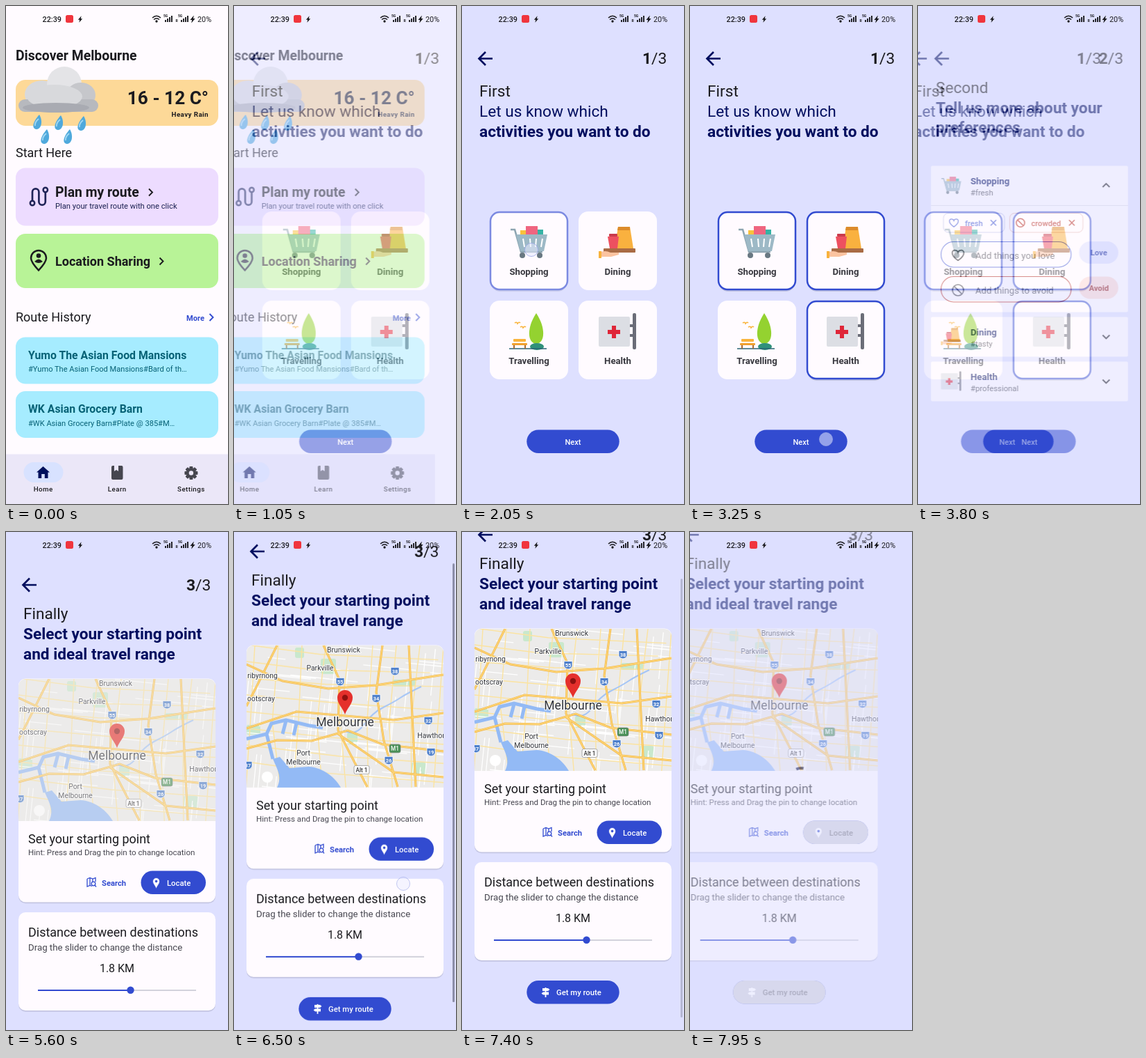
These frames come from a looping animation (320 by 715 pixels, 8000 ms). An HTML page:

```html
<!DOCTYPE html>
<html lang="en">
<head>
<meta charset="utf-8">
<title>Route planner</title>
<style>
  html, body { margin: 0; width: 100%; height: 100%; overflow: hidden; background: #dee0ff; }
  svg { display: block; width: 320px; height: 715px; font-family: Roboto, "Noto Sans", sans-serif; }
  text { white-space: pre; }
</style>
</head>
<body>
<svg id="stage" viewBox="0 0 320 715"></svg>
<script>
const LOOP = 8000;
const INK = '#1b1b1f', GREY = '#46464f', NAVY = '#000d5e', BLUE = '#324bd0', RED = '#b3261e';
const PAPER = '#fffbff', LAVENDER = '#dee0ff', TEAL = '#076276';
const SLIDE = 'cubic-bezier(.3,0,.3,1)', SLIDE_MS = 300, SLIDE_PX = 32;

// Markup helpers
const text = (x, y, str, size, fill = INK, weight = 400, more = '') =>
  `<text x="${x}" y="${y}" font-size="${size}" fill="${fill}" font-weight="${weight}" ${more}>${str}</text>`;
const mid = (x, y, str, size, fill, weight, more = '') =>
  text(x, y, str, size, fill, weight, `text-anchor="middle" ${more}`);
const rect = (x, y, w, h, r, fill, more = '') =>
  `<rect x="${x}" y="${y}" width="${w}" height="${h}" rx="${r}" fill="${fill}" ${more}/>`;
const dot = (x, y, r, fill, more = '') => `<circle cx="${x}" cy="${y}" r="${r}" fill="${fill}" ${more}/>`;
const oval = (x, y, rx, ry, fill) => `<ellipse cx="${x}" cy="${y}" rx="${rx}" ry="${ry}" fill="${fill}"/>`;
const shape = (d, fill, more = '') => `<path d="${d}" fill="${fill}" ${more}/>`;
const line = (d, stroke, width = 2, more = '') =>
  `<path d="${d}" fill="none" stroke="${stroke}" stroke-width="${width}" ${more}/>`;
const group = (x, y, body, scale = 1) => `<g transform="translate(${x} ${y}) scale(${scale})">${body}</g>`;
const raised = (x, y, w, h, r) => rect(x, y + 1.8, w, h, r, '#c3c5e2') + rect(x, y, w, h, r, PAPER);
const page = (id, fill, body) => `<g id="${id}">${rect(-40, 0, 400, 715, 0, fill)}${body}</g>`;
const chevron = (x, y, color) => line(`M${x - 2.5} ${y - 5}l5 5-5 5`, color, 1.9);
const cross = (x, y, color) => line(`M${x - 4} ${y - 4}l8 8m0-8l-8 8`, color, 1.6);
const ban = (x, y, r, color) =>
  dot(x, y, r, 'none', `stroke="${color}" stroke-width="1.6"`) + line(`M${x - r * .7} ${y - r * .7}l${r * 1.4} ${r * 1.4}`, color, 1.6);
const heart = (x, y, s, color) =>
  group(x, y, line('M0 7C-12-1-8-8-4-7Q-1-7 0-4Q1-7 4-7C8-8 12-1 0 7Z', color, 1.6), s);
const pin = (x, y, s, fill, hole) =>
  group(x, y, shape('M0 24C-3 15-11 9-11 0A11 11 0 0 1 11 0C11 9 3 15 0 24Z', fill) + dot(0, 0, 4.2, hole), s);

// Illustrations, each centred on the origin
const art = {
  Shopping:
    rect(-12, -17, 10, 8, 0, '#f9c23c') + rect(-4, -23, 17, 13, 0, '#ef6580') + rect(13, -18, 8, 8, 0, '#35b3a5') +
    line('M-26-18H-20L-11 14H20', '#8da5b1', 2.6) + shape('M-18-11H27L22 13H-12Z', '#9db9c6') +
    line('M-8-5l2 12M2-5l1 12M11-5l-1 12M20-5l-2 12', '#fff', 2) + dot(-9, 19, 4, '#687882') + dot(16, 19, 4, '#687882'),
  Dining:
    shape('M1-22H18L23 9H-4Z', '#f9b13f') + shape('M1-22H18V-17H0Z', '#dc8b2b') +
    shape('M-14-8H2L0 9H-11Z', '#ed5060') + rect(-12, -12, 12, 4, 1, '#c93b4c') +
    rect(-20, 9, 46, 6, 1, '#a96b45') + shape('M-26 15Q-18 11-10 15H2V18L-9 21H-26Z', '#fbc3a0') + rect(-27, 13, 4, 10, 0, '#f8b23c'),
  Travelling:
    rect(10, 2, 2, 22, 0, '#8b5a34') + shape('M11-26C25-5 24 17 11 18C-2 17-3-5 11-26Z', '#94d230') +
    oval(12, 22, 10, 5, '#30917a') + line('M-28 25H26', '#2a6474', 1.6) +
    rect(-22, 11, 18, 4, 1, '#f9b43d') + rect(-24, 17, 22, 3, 1, '#f0a02e') + line('M-21 20v5M-5 20v5', '#a66a35', 2) +
    line('M-20-12q3-2 4 1q2-3 4-1M-12-6q3-2 4 1q2-3 4-1', '#f9b43d', 1.6),
  Health:
    rect(22, -26, 5, 52, 2, '#6b6d78') + rect(16, -10, 8, 4, 0, '#6b6d78') + rect(16, 4, 8, 4, 0, '#6b6d78') +
    rect(-27, -21, 45, 43, 2, '#dcdee4') + shape('M-8-10h6v6h6v6h-6v6h-6v-6h-6v-6h6Z', '#df2638', 'transform="translate(0 2)"'),
};

const statusBar = () => {
  const bars = x => [3, 5, 7, 9].map((h, i) => rect(x + i * 3, 23 - h, 1.9, h, 0, INK)).join('');
  const bolt = (x, s) => group(x, 19, shape('M2-6L-4 1H-1L-2 6L4-1H1Z', INK), s);
  return text(52.5, 23, '22:39', 10.8, INK, 500) + rect(86, 13, 11, 11, 2.5, '#f0353d') + bolt(107, .8) +
    line('M211 17Q217 11.5 223 17M213 19.5Q217 16 221 19.5', INK, 1.6) + dot(217, 22, 1.7, INK) +
    text(227, 16, '5G', 5, INK, 700) + bars(229) + text(248, 16, '5G', 5, INK, 700) + text(244.5, 23, 'R', 5, INK, 700) + bars(252) +
    bolt(269, .9) + text(276, 23, '20%', 10.8);
};

const home = () => {
  const drop = (x, y) => group(x, y, shape('M3-11C8-3 7 9-1 10C-9 9-6-1 3-11Z', '#4fa9dc') + line('M2-5Q-4 0-3 5', '#9fd6f2', 2));
  const cloud = oval(52, 127, 25, 20, '#d8d9dc') + dot(84, 112, 25, '#e4e4e7') + oval(108, 128, 21, 18, '#c6c7cb') +
    rect(18, 134, 115, 18, 9, '#b7b9be') + oval(70, 130, 40, 17, '#d8d9dc') + oval(72, 146, 48, 7, '#a9abb2');
  const routeIcon = line('M38 280V267a4.7 4.7 0 0 1 9.4 0V281a4.7 4.7 0 0 0 9.4 0V268', '#202457', 2.7) +
    dot(38, 283, 3.2, '#eddcff', 'stroke="#202457" stroke-width="2.5"') + dot(56.8, 264, 3.2, '#eddcff', 'stroke="#202457" stroke-width="2.5"');
  const shareIcon = line('M47 379.5C40 372 36 367 36 362A11 11 0 0 1 58 362C58 367 54 372 47 379.5Z', INK, 2.5) +
    dot(47, 358.5, 3.3, INK) + shape('M41 367Q47 360 53 367Q47 371 41 367Z', INK);
  const entry = (y, name, tags) => rect(14, y, 292, 67, 14, '#a6ecff') +
    text(32, y + 31, name, 15.8, TEAL, 700) + text(32, y + 49.5, tags, 11.1, TEAL);
  const tab = (x, label) => mid(x, 697, label, 9.8, INK, 500, 'letter-spacing=".41"');
  const teeth = [0, 45, 90, 135].map(a => rect(264.4, 661, 5, 19, 1, GREY, `transform="rotate(${a} 266.9 670.5)"`)).join('');
  return text(14, 77.5, 'Discover Melbourne', 19.4, INK, 700) +
    rect(14, 106, 292, 66, 14, '#fdd998') + cloud +
    drop(45, 167) + drop(76, 168) + drop(109, 169) + drop(56, 188) + drop(89, 188) +
    text(292, 141, '16 - 12 C°', 26.2, INK, 700, 'text-anchor="end"') +
    text(292, 159, 'Heavy Rain', 9.8, INK, 700, 'text-anchor="end" letter-spacing=".41"') +
    text(14, 217, 'Start Here', 18) +
    rect(14, 232.5, 292, 83, 14, '#eddcff') + routeIcon + text(71, 274, 'Plan my route', 19.4, INK, 700) + chevron(208.5, 267.5, INK) +
    text(71, 291, 'Plan your travel route with one click', 11.2, '#1d2250') +
    rect(14, 327, 292, 78, 14, '#b8f397') + shareIcon + text(71, 372.5, 'Location Sharing', 18, INK, 700) + chevron(224, 366.5, INK) +
    text(14, 453, 'Route History', 18) + text(260, 451.5, 'More', 11.1, BLUE, 700) + chevron(296, 447, BLUE) +
    entry(475.5, 'Yumo The Asian Food Mansions', '#Yumo The Asian Food Mansions#Bard of th…') +
    entry(553, 'WK Asian Grocery Barn', '#WK Asian Grocery Barn#Plate @ 385#M…') +
    rect(-1, 643.5, 322, 73, 0, '#ebe7f8') + rect(25.5, 655, 57, 29, 14.5, '#d8e2ff') +
    shape('M53.5 661L63 669.5H60.5V678H55.8V672H51.2V678H46.5V669.5H44Z', '#00105c') + tab(53.7, 'Home') +
    rect(152, 660, 16.5, 20, 2, GREY) + shape('M156 660h6v8l-3-2-3 2Z', '#ebe7f8') + tab(160.2, 'Learn') +
    teeth + dot(266.9, 670.5, 7.2, GREY) + dot(266.9, 670.5, 3.2, '#ebe7f8') + tab(266.9, 'Settings');
};

const header = (n, y) =>
  line(`M44 ${y}H25M34 ${y - 9.5}L24.5 ${y}L34 ${y + 9.5}`, NAVY, 2.7) +
  text(260, y + 7.5, `<tspan font-weight="700">${n}</tspan>/3`, 22.75);
const nextButton = id => rect(93.3, 608.5, 133.4, 33.5, 16.7, BLUE) +
  rect(93.3, 608.5, 133.4, 33.5, 16.7, '#fff', `id="${id}" opacity="0"`) + mid(160, 629.5, 'Next', 11.1, '#fff', 500);

const cards = [['Shopping', 40, 295], ['Dining', 168, 295], ['Travelling', 40, 423], ['Health', 168, 423]];
const activities = () => header(1, 75.5) + text(25, 129.5, 'First', 22.65) +
  text(25, 158.5, 'Let us know which', 22.65, NAVY) + text(25, 188, 'activities you want to do', 22.65, NAVY, 700) +
  cards.map(([name, x, y]) => rect(x, y, 113, 113, 14, PAPER) +
    `<g id="pick${name}" opacity="0">${rect(x + 1, y + 3, 111, 112, 14, '#bfc2e2')}${rect(x + 1, y + 1, 111, 111, 13, PAPER, `stroke="${BLUE}" stroke-width="2.5"`)}</g>` +
    group(x + 56, y + 44, art[name]) + mid(x + 56.5, y + 91, name, 13.2, '#38383f', 700)).join('') +
  nextButton('press1');

const preferences = () => {
  const row = (y, name, tag) => group(47, y + 28, art[name], .54) + text(75, y + 26.5, name, 13.2, NAVY, 700) + text(75, y + 42, tag, 11.3, GREY);
  const down = y => line(`M265.5 ${y - 2.5}l5 5 5-5`, INK, 1.8);
  const chip = (x, w, label, color, border) => rect(x, 297.5, w, 27.5, 7, PAPER, `stroke="${border}" stroke-width="1"`) +
    text(x + 31, 315.5, label, 11.2, color, 500) + cross(x + w - 16, 311.3, color);
  const field = (y, label, color) => rect(32.5, y, 187.5, 36.5, 18, PAPER, `stroke="${color}" stroke-width="1.1"`) + text(82, y + 24.5, label, 13.2, GREY);
  const action = (y, label, fill, color) => rect(231.5, y, 56.5, 32, 16, fill) + mid(260, y + 20.3, label, 11.2, color, 700);
  return header(2, 75.5) + text(25, 124.5, 'Second', 22.65) +
    text(25, 153.5, 'Tell us more about your', 22.65, NAVY, 700) + text(25, 182, 'preferences', 22.65, NAVY, 700) +
    rect(18, 229.5, 284, 210, 2, PAPER) + row(229.5, 'Shopping', '#fresh') + line('M265.5 260l5-5 5 5', INK, 1.8) + line('M18 286.5H302', '#dddbe6', 1) +
    chip(36, 88, 'fresh', BLUE, '#b7bce9') + heart(51, 311.5, .8, BLUE) +
    chip(131.5, 105.5, 'crowded', RED, '#e4b4b3') + ban(147, 311.3, 6, RED) +
    field(338.5, 'Add things you love', BLUE) + heart(57, 358, 1.05, INK) + action(338, 'Love', LAVENDER, '#14269b') +
    field(388.5, 'Add things to avoid', RED) + ban(57, 408, 8, GREY) + action(388.5, 'Avoid', '#fbd8d5', '#8c1111') +
    rect(18, 446.5, 284, 57, 2, PAPER) + row(446.5, 'Dining', '#tasty') + down(475) +
    rect(18, 510.5, 284, 57, 2, PAPER) + row(510.5, 'Health', '#professional') + down(539) + nextButton('press2');
};

const map = () => {
  let seed = 7;
  const rnd = () => (seed = seed * 16807 % 2147483647) / 2147483647;
  const streets = (n, draw) => Array.from({ length: n }, draw).join('');
  const minor = streets(80, (_, i) => {
    const x = 18 + rnd() * 284, y = 163 + rnd() * 203, len = 25 + rnd() * 55;
    return i % 2 ? `M${x} ${y}l${len} ${len * .1}` : `M${x} ${y}l${-len * .1} ${len}`;
  });
  const arterial = streets(17, (_, i) => i % 2
    ? `M18 ${150 + i * 12}l${90 + rnd() * 60} ${8 + rnd() * 9}l170 ${rnd() * 14}`
    : `M${30 + i * 17} 163l${-5 - rnd() * 8} 110l${rnd() * 20 - 8} 95`);
  const roads = 'M18 311L62 299L112 300L164 285L214 305L302 315M129 163L152 212L150 285L192 366' +
    'M18 190L70 214L136 225L205 220L302 205M214 163L205 230L216 300L236 366M62 163L31 225L18 250' +
    'M302 260L230 270L90 258L18 282M252 163L262 366M150 290L230 345L302 352';
  const shield = (x, y, n) => shape(`M${x - 6} ${y - 5.5}h12v7q-1 4-6 4.5q-5-.5-6-4.5Z`, '#4d7fcb', 'stroke="#fff" stroke-width=".8"') + mid(x, y + 2.6, n, 7.5, '#fff', 700);
  const tag = (x, y, w, s, fill, color) => rect(x - w / 2, y - 6, w, 12, 2.5, fill, 'stroke="#777" stroke-width=".6"') + mid(x, y + 3, s, 8.2, color, 500);
  const place = (x, y, s, size = 10.4) => mid(x, y, s, size, '#303238', 400, 'stroke="#fff" stroke-width="2" paint-order="stroke"');
  return `<g clip-path="url(#mapClip)">${rect(18, 163, 284, 204, 0, '#ecebea')}<g id="map">` +
    rect(125, 182, 22, 22, 3, '#c9e8cd') + rect(163, 288, 15, 17, 3, '#c9e8cd') + rect(88, 166, 13, 15, 3, '#c9e8cd') +
    rect(228, 212, 34, 10, 4, '#c9e8cd') + rect(255, 331, 22, 18, 4, '#c9e8cd') + rect(18, 277, 20, 14, 3, '#c9e8cd') +
    line(minor, '#fff', 1.3) + line(arterial, '#fbe3a0', 1.4) +
    shape('M62 367C70 352 62 340 56 326L66 323L80 339L108 337C124 338 143 348 154 367Z', '#93baf5') +
    line('M18 297L47 290L56 326M47 290L54 275L75 270L108 278L128 281M75 271L70 290M90 275L86 292', '#93baf5', 5) +
    line('M158 285Q175 294 187 277T215 252T240 238T270 222', '#a4c5f6', 2) +
    line(roads, '#f1b23f', 3) + line(roads, '#fdd475', 1.8) +
    place(158, 173, 'Brunswick') + place(124, 199, 'Parkville') + place(41, 210, 'ribyrnong') + place(39, 243, 'ootscray') +
    place(284, 296, 'Hawthor') + place(100, 321, 'Port') + place(100, 334, 'Melbourne') + place(160, 279, 'Melbourne', 17.6) +
    shield(232, 200, 38) + shield(153, 215, 55) + shield(205, 239, 34) + shield(280, 271, 32) + shield(284, 316, 19) + shield(223, 328, 26) + shield(20, 335, 37) +
    tag(232, 311, 16, 'M1', '#4a9157', '#fff') + tag(184, 341.5, 22, 'Alt 1', '#fff', '#333') +
    dot(48, 352, 8, '#fff') + pin(160, 238, 1, '#e5302c', '#8d1210') + '</g></g>';
};

const range = () => {
  const button = (x, y, w, label, labelX) => {
    const pill = fill => rect(x, y, w, 33.5, 16.7, fill);
    return pill(BLUE) + text(labelX, y + 21, label, 11.3, '#fff', 500) +
      `<g class="off">${pill('#d0d0dc')}${text(labelX, y + 21, label, 11.3, '#77777f', 500)}</g>`;
  };
  return `<g id="scroll">` + header(3, 28) + text(25, 77, 'Finally', 22.65) +
    text(25, 106, 'Select your starting point', 22.65, NAVY, 700) + text(25, 135, 'and ideal travel range', 22.65, NAVY, 700) +
    raised(18, 162.5, 284, 321, 10) + map() +
    text(32, 398.5, 'Set your starting point', 17.95) + text(32, 416, 'Hint: Press and Drag the pin to change location', 11.55, GREY) +
    line('M117 450l4-1.5 4 1.5 4-1.5V454M117 450v11l4-1.5 3 1M121 449v10M125 450v4', BLUE, 1.3) + dot(126, 457, 2.8, 'none', `stroke="${BLUE}" stroke-width="1.3"`) + line('M128 459l2 2.5', BLUE, 1.3) +
    text(138, 459.5, 'Search', 11.2, BLUE, 700) + button(194.5, 438.5, 93.5, 'Locate', 232) + pin(216.5, 453.5, .42, '#fff', BLUE) +
    raised(18, 498, 284, 141, 10) + text(32, 533, 'Distance between destinations', 17.95) +
    text(32, 552.5, 'Drag the slider to change the distance', 13.25, GREY) + mid(160, 583.5, '1.8 KM', 16) +
    line('M46 610H274', '#d2d2dc', 1.8) + line('M46 610H180', BLUE, 2) + dot(179.5, 609.8, 5.2, BLUE) +
    button(93.3, 668, 133.4, 'Get my route', 136) + rect(93.3, 668, 133.4, 33.5, 16.7, '#fff', 'id="press3" opacity="0"') +
    line('M120.5 678v14', '#fff', 1.8) + shape('M116 679h8l2.5 2-2.5 2h-8ZM125 684.5h-8l-2.5 2 2.5 2h8Z', '#fff') +
    `</g>` + rect(315, 45, 3, 630, 1.5, '#8c8ea8', 'id="bar"');
};

document.getElementById('stage').innerHTML =
  `<defs><clipPath id="mapClip"><path d="M18 367V173a10 10 0 0 1 10-10H292a10 10 0 0 1 10 10V367Z"/></clipPath></defs>` +
  rect(0, 0, 320, 715, 0, LAVENDER) +
  page('home', PAPER, home()) + page('activities', LAVENDER, activities()) +
  page('preferences', LAVENDER, preferences()) + page('range', LAVENDER, range()) +
  page('loading', LAVENDER, line('M152.5 340.5A19 19 0 0 1 163 339.3', NAVY, 4)) +
  '<g id="taps"></g>' + statusBar();

// Motion: steps are [time, value, easing to the next step]
const get = id => document.getElementById(id);
const play = (el, prop, steps) => {
  const full = [[0, steps[0][1]], ...steps, [LOOP, steps.at(-1)[1]]];
  el.animate(full.map(([t, v, easing = 'linear']) => ({ offset: t / LOOP, [prop]: v, easing })), { duration: LOOP, iterations: Infinity });
};
const shift = (x, y = 0) => `translate(${x}px, ${y}px)`;
const slide = (start, from, to) => [[start, shift(from), SLIDE], [start + SLIDE_MS, shift(to)]];

const entries = [['home'], ['activities', 800], ['preferences', 3550], ['range', 5000], ['loading', 7700]];
entries.forEach(([id, start], i) => {
  const leave = entries[i + 1]?.[1];
  play(get(id), 'transform', [
    ...(start ? slide(start, SLIDE_PX, 0) : []),
    ...(leave ? slide(leave, 0, -SLIDE_PX) : []),
  ]);
  if (start) play(get(id), 'opacity', [[start + 200, 0], [start + SLIDE_MS, 1]]);
});

[['Shopping', 2000], ['Dining', 2300], ['Health', 2600]].forEach(([name, t]) => play(get('pick' + name), 'opacity', [[t, 0], [t + 80, 1]]));
[['press1', 3300], ['press2', 4750], ['press3', 7500]].forEach(([id, t]) => play(get(id), 'opacity', [[t, 0], [t + 120, .14], [t + 220, .14], [t + 400, 0]]));

play(get('map'), 'opacity', [[5450, 0], [5700, 1]]);
play(get('scroll'), 'transform', [[6350, shift(0, 48)], [6500, shift(0, 0), 'ease-out'], [6750, shift(0, -24)]]);
play(get('bar'), 'transform', [[6350, shift(0, -44)], [6500, shift(0, 0), 'ease-out'], [6750, shift(0, 22)]]);
play(get('bar'), 'opacity', [[6350, 0], [6400, 1], [7250, 1], [7550, 0]]);
document.querySelectorAll('.off').forEach(el => play(el, 'opacity', [[7700, 0], [7700, 1]]));

const taps = [[170, 275, 600], [100, 350, 1950], [228, 350, 2250], [228, 478, 2550], [196, 622, 3250], [188, 627, 4700], [244, 505, 6350, 55], [175, 660, 7450]];
taps.forEach(([x, y, t, drag = 0]) => {
  get('taps').insertAdjacentHTML('beforeend', dot(x, y, 9.5, '#e8ebff', 'fill-opacity=".55" stroke="#9aa6e6" stroke-opacity=".8"'));
  const mark = get('taps').lastChild;
  play(mark, 'opacity', [[t, 0], [t, 1], [t + 120, 1], [t + 250, 0]]);
  if (drag) play(mark, 'transform', [[t, shift(0, drag)], [t + 140, shift(0)]]);
});
</script>
</body>
</html>
```
